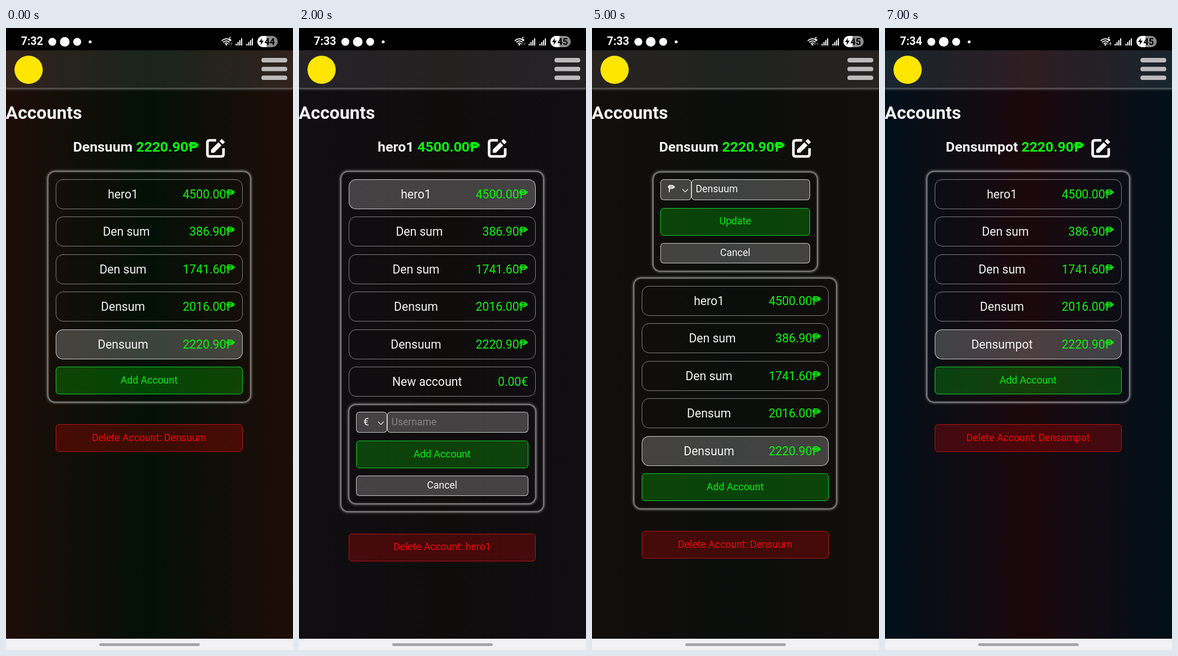
Animation of 508 by 1102 pixels, one loop 8000 ms. Source, as an HTML page:

```html
<!DOCTYPE html>
<html lang="en">
<head>
<meta charset="utf-8">
<title>Accounts</title>
<style>
  * { box-sizing: border-box; }
  html, body { margin: 0; width: 100%; height: 100%; overflow: hidden; background: #000; }
  #stage { position: relative; width: 508px; height: 1102px; overflow: hidden;
    font: 17.64px/1 Roboto, "Noto Sans", sans-serif; color: #f4f4f4; }
  #stage > * { position: absolute; white-space: pre; }
  .page { left: 0; top: 39px; width: 508px; height: 1043px; }
  .header { left: 0; top: 39px; width: 508px; height: 68px; background: #ffffff16;
    border-bottom: 1px solid #ffffff40; box-shadow: 0 1px 4px #ffffff70; }
  .heading { left: -.5px; top: 135px; font-size: 31.75px; font-weight: 700; }
  .title { left: 0; top: 193.5px; width: 507px; height: 36px; display: flex; justify-content: center;
    align-items: center; font-size: 24.77px; font-weight: 700; }
  .title svg { margin: 2px 0 0 13px; }
  .money { color: #0bf50b; }
  .panel { border: 2px solid #ffffff70; border-radius: 14px;
    box-shadow: 0 0 4px #ffffff90, inset 0 0 3px #ffffff50; }
  .row, .button, .field { display: flex; align-items: center; border: 1px solid #ffffff78; }
  .row { border-radius: 13px; padding: 0 12.4px; font-size: 21.17px; }
  .row span:first-child { flex: 1; text-align: center; }
  .button { justify-content: center; border-radius: 6px; }
  .field { border-radius: 6px; padding-left: 7px; }
  .select { padding-left: 12px; }
  .filled { background: #ffffff38; border-color: #ffffffb8; }
  .add { color: #04ea12; background: #00ff0038; border-color: #12cf2a; }
  .delete { color: #ec0808; background: #ff000038; border-color: #b81414; }
  .hint { color: #858585; }
  .nav { left: 0; top: 1082px; width: 508px; height: 20px; background: #f2f1f4; }
  .nav::after { content: ""; position: absolute; left: 165px; top: 7.5px; width: 178px; height: 5px;
    border-radius: 3px; background: #a5a4a6; }
</style>
</head>
<body>
<div id="stage"></div>
<script>
const stage = document.getElementById('stage');
const STEP = 1000, PITCH = 66.5;
const SHORT = 'Densuum', LONG = 'Densumpot', FRESH = 'New account';
const ACCOUNTS = [['hero1', '4500.00₱'], ['Den sum', '386.90₱'], ['Den sum', '1741.60₱'],
  ['Densum', '2016.00₱'], [SHORT, '2220.90₱']];

// edge / center: page gradient; adding, editing: text in the open form ('' shows the hint)
const STATES = [
  { time: '7:32', charge: 44, edge: '#1e0d08', center: '#031006', selected: 4 },
  { time: '7:33', charge: 44, edge: '#160b20', center: '#170b00', selected: 0, adding: FRESH },
  { time: '7:33', charge: 45, edge: '#100e12', center: '#0f0c0c', selected: 0, adding: '', fresh: true },
  { time: '7:33', charge: 45, edge: '#02130a', center: '#0e0c19', selected: 5, adding: '', fresh: true },
  { time: '7:33', charge: 45, edge: '#1e0a1c', center: '#150b01', selected: 0, adding: '', upload: true },
  { time: '7:33', charge: 45, edge: '#120e0c', center: '#0b0e0c', selected: 4, editing: SHORT },
  { time: '7:33', charge: 45, edge: '#170b02', center: '#02100b', selected: 4, editing: LONG },
  { time: '7:34', charge: 45, edge: '#02101a', center: '#1b080c', selected: 4, renamed: true, upload: true },
];

const box = (cls, x, y, w, h, content = '') =>
  `<div class="${cls}" style="left:${x}px;top:${y}px;width:${w}px;height:${h}px">${content}</div>`;
const money = amount => `<span class="money">${amount}</span>`;

const editIcon = `<svg width="34" height="34" viewBox="0 0 34 34" fill="#fff">
  <path d="M18 3H6.5Q2.5 3 2.5 7V27.5Q2.5 31.5 6.5 31.5H27Q31 31.5 31 27.5V17" fill="none" stroke="#fff" stroke-width="4.6"/>
  <path d="M9 25V19.5L22 6.5 27.5 12 14.5 25ZM24 4.5L28 .5 33.5 6 29.5 10Z"/></svg>`;

function statusBar({ time, charge, upload }) {
  const bars = x => [0, 1, 2, 3].map(i =>
    `<rect x="${x + i * 3.2}" y="${28 - i * 3.2}" width="2" height="${3 + i * 3.2}"/>`).join('');
  const wave = r => `<path d="M${390 - r * .75} ${30.5 - r * .7}Q390 ${30.5 - r * 1.35} ${390 + r * .75} ${30.5 - r * .7}"/>`;
  const dim = upload ? '#fff' : '#777';
  return `<svg width="508" height="107" style="left:0;top:0" fill="#fff" font-weight="700" font-family="Roboto, sans-serif">
    <rect width="508" height="39.5" fill="#000"/>
    <text x="26.5" y="30" font-size="19.5">${time}</text>
    <circle cx="82" cy="24.5" r="7"/><circle cx="104" cy="24.5" r="8.5"/><circle cx="126" cy="24.5" r="7"/>
    <circle cx="149" cy="24.5" r="2.6"/>
    <g fill="none" stroke="#fff" stroke-width="1.7">${[11, 7.5, 4].map(wave).join('')}</g>
    <circle cx="390" cy="29.5" r="1.6"/>
    <text x="394" y="23" font-size="8.5">5</text>
    <path d="M394.5 25V30M392.7 28.3L394.5 30.2 396.3 28.3" fill="none" stroke="#777"/>
    <path d="M399 31V26M397.2 27.8L399 25.8 400.8 27.8" fill="none" stroke="${dim}"/>
    ${bars(406.5)}${bars(425.5)}
    <rect x="445" y="14" width="36" height="20" rx="10" fill="#8b8b8b"/>
    <path d="M461 14H455A10 10 0 0 0 455 34H461Z"/>
    <path d="M453 17.5L448 25H451.5L450.5 30.5 456 22.5H452.3Z" fill="#000"/>
    <text x="457.5" y="29.8" font-size="16" fill="#000">${charge}</text>
    <circle cx="40" cy="74" r="25" fill="#ffe600"/>
    <path d="M456 57H494M456 72.7H494M456 88.2H494" stroke="#bcb9ba" stroke-width="7.8" stroke-linecap="round"/>
  </svg>`;
}

function form(x, y, width, currency, value, action) {
  const left = x + 14, inner = width - 28;
  const chevron = `<svg width="12" height="8" style="position:absolute;left:36.5px;top:15px">
    <path d="M1 1.5L6 6.5 11 1.5" fill="none" stroke="#eee" stroke-width="1.2"/></svg>`;
  return box('panel', x, y - .5, width, 178)
    + box('field select filled', left, y + 13.5, 54.5, 37.4, currency + chevron)
    + box('field filled', left + 54.5, y + 13.5, inner - 54.5, 37.4,
        value || '<span class="hint">Username</span>')
    + box('button add', left, y + 64.5, inner, 49.2, action)
    + box('button filled', left, y + 126.5, inner, 36.3, 'Cancel');
}

function render(state) {
  const { edge, center, selected, adding, editing } = state;
  const accounts = ACCOUNTS.map(a => [...a]);
  if (state.renamed) accounts[4][0] = LONG;
  if (state.fresh) accounts.push([FRESH, '0.00€']);
  const [name, amount] = accounts[selected];

  const isAdding = adding !== undefined;
  const top = editing ? 443 : 254;
  const firstRow = top + 13.5;
  const end = firstRow + accounts.length * PITCH;
  const bottom = end + (isAdding ? 190 : 63);

  stage.innerHTML =
    `<div class="page" style="background:linear-gradient(90deg,${edge},${center},${edge})"></div>
    <div class="header"></div>${statusBar(state)}
    <div class="heading">Accounts</div>
    <div class="title">${name} ${money(amount)}${editIcon}</div>`
    + (editing ? form(107, 254, 293, '₱', editing, 'Update') : '')
    + box('panel', 73, top - 1, 361, bottom - top + 2)
    + accounts.map(([label, sum], i) =>
        box('row' + (i === selected ? ' filled' : ''), 88, firstRow + i * PITCH, 330.5, 53.2,
          `<span>${label}</span>${money(sum)}`)).join('')
    + (isAdding ? form(87, end, 332.5, '€', adding, 'Add Account')
                : box('button add', 88, end + .3, 330.5, 49.2, 'Add Account'))
    + box('button delete', 88, bottom + 39, 330.5, 49.2, `Delete Account: ${name}`)
    + '<div class="nav"></div>';
}

let shown = -1;
function tick() {
  const index = Math.floor(performance.now() / STEP) % STATES.length;
  if (index !== shown) render(STATES[shown = index]);
  requestAnimationFrame(tick);
}
tick();
</script>
</body>
</html>
```
